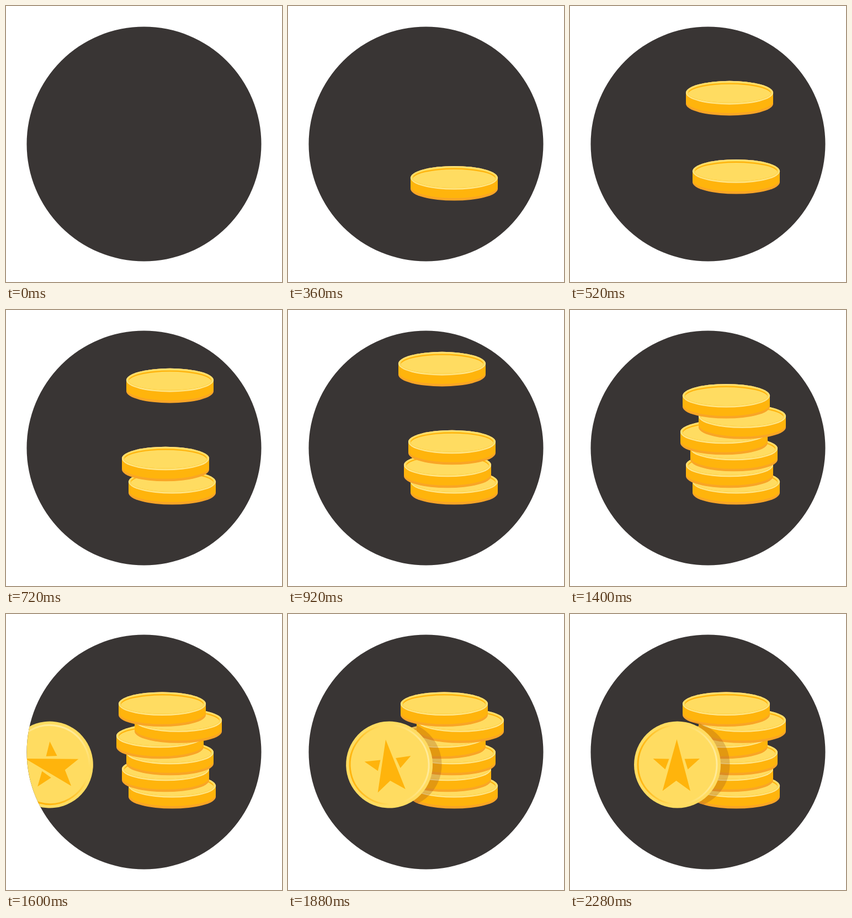
Recreate the animation shown at these times as an HTML page with a canvas. Size 500 by 500 pixels, loop 3.4 s.

```html
<!DOCTYPE html>
<html>
<head>
<meta charset="utf-8">
<title>Coin stack</title>
<style>
  html, body { margin: 0; width: 100%; height: 100%; overflow: hidden; background: #fff; }
  canvas { display: block; width: 500px; height: 500px; }
</style>
</head>
<body>
<canvas id="stage" width="500" height="500"></canvas>
<script>
const ctx = document.getElementById('stage').getContext('2d');
const LOOP = 3400, STEP = 40, TAU = Math.PI * 2;
const DARK = '#393534', PALE = '#ffdc61', LIGHT = '#ffeb9c', ORANGE = '#ffb40c', SHADE = '#f9a526';

// Coin geometry and the resting centre of each top face, from the bottom up
const RX = 79, RY = 21.3, WALL = 20;
const COINS = [[301, 311.3], [289, 281], [297, 251], [279, 221], [312, 192.5], [283, 162.8]];
const FALL = 200, DROP = 344, BOUNCE = 240, HOP = 13.5;
const STAR_R = 78.5, STAR_X = 194.5, STAR_Y = 273, DEG_PER_PX = 0.65;

const clamp = v => Math.max(0, Math.min(1, v));

function disc(x, y, rx, ry = rx) {
  const path = new Path2D();
  path.ellipse(x, y, rx, ry, 0, 0, TAU);
  return path;
}

function polygon(...points) {
  const path = new Path2D();
  points.forEach(([x, y]) => path.lineTo(x, y));
  path.closePath();
  return path;
}

function fill(path, color) {
  ctx.fillStyle = color;
  ctx.fill(path);
}

// Side silhouette of a lying coin
function body(x, y, height) {
  const path = new Path2D();
  path.ellipse(x, y, RX, RY, 0, Math.PI, TAU);
  path.ellipse(x, y + height, RX, RY, 0, 0, Math.PI);
  path.closePath();
  return path;
}

function drawCoin(x, y) {
  fill(body(x, y, WALL), SHADE);
  fill(body(x, y, WALL - 4.5), ORANGE);
  fill(disc(x, y, RX, RY), LIGHT);
  fill(disc(x, y - 0.4, RX - 1, RY - 1.1), PALE);
  ctx.save();
  ctx.clip(disc(x, y, RX - 4, RY - 3.6));
  fill(disc(x, y, RX, RY), ORANGE);
  fill(disc(x, y + 3, RX - 3.5, RY - 3), PALE);
  ctx.restore();
}

// Vertical offset from rest: accelerating drop, then one low hop
function coinOffset(t, index) {
  const age = t - 160 - index * 200;
  if (age < FALL) return age < 0 ? -DROP : DROP * ((age / FALL) ** 2 - 1);
  const p = clamp((age - FALL) / BOUNCE);
  return -4 * HOP * p * (1 - p);
}

// Horizontal offset from rest: rolls in, passes by 5 px and settles
function starOffset(t) {
  if (t < 2040) return 5 - 287 * ((2040 - t) / 680) ** 2;
  const p = clamp((t - 2040) / 240);
  return 5 * (1 + Math.cos(Math.PI * p)) / 2;
}

function drawStarCoin(offset) {
  ctx.save();
  ctx.translate(STAR_X + offset, STAR_Y);
  ctx.rotate(offset * DEG_PER_PX * Math.PI / 180);
  fill(disc(0, 0, STAR_R), PALE);
  const rim = ctx.createLinearGradient(-72, 0, 72, 0);
  rim.addColorStop(0, ORANGE);
  rim.addColorStop(0.45, PALE);
  rim.addColorStop(0.6, PALE);
  rim.addColorStop(1, LIGHT);
  ctx.strokeStyle = rim;
  ctx.lineWidth = 3;
  ctx.stroke(disc(0, 0, 71.5));
  fill(polygon([-1, -46], [23.5, 47.5], [-2, 29], [-27, 47.5]), ORANGE);
  fill(polygon([-44, -11], [-15, -10.5], [-22, 8.5]), ORANGE);
  fill(polygon([40.5, -11], [13, -10.5], [19, 8.5]), ORANGE);
  ctx.restore();
}

function draw(t) {
  ctx.clearRect(0, 0, 500, 500);
  const backdrop = disc(250, 250, 212.5);
  fill(backdrop, DARK);
  ctx.save();
  ctx.clip(backdrop);

  const stack = new Path2D();
  COINS.forEach(([x, restY], i) => {
    const y = restY + coinOffset(t, i);
    drawCoin(x, y);
    stack.addPath(body(x, y, WALL));
  });

  if (t >= 1360) {
    const offset = starOffset(t);
    ctx.save();
    ctx.clip(stack);
    fill(disc(STAR_X + offset + 16.5, STAR_Y, STAR_R), 'rgba(150, 80, 30, 0.28)');
    ctx.restore();
    drawStarCoin(offset);
  }
  ctx.restore();
}

function tick() {
  const t = performance.now() % LOOP;
  draw(Math.floor(t / STEP) * STEP);
  requestAnimationFrame(tick);
}
tick();
</script>
</body>
</html>
```
